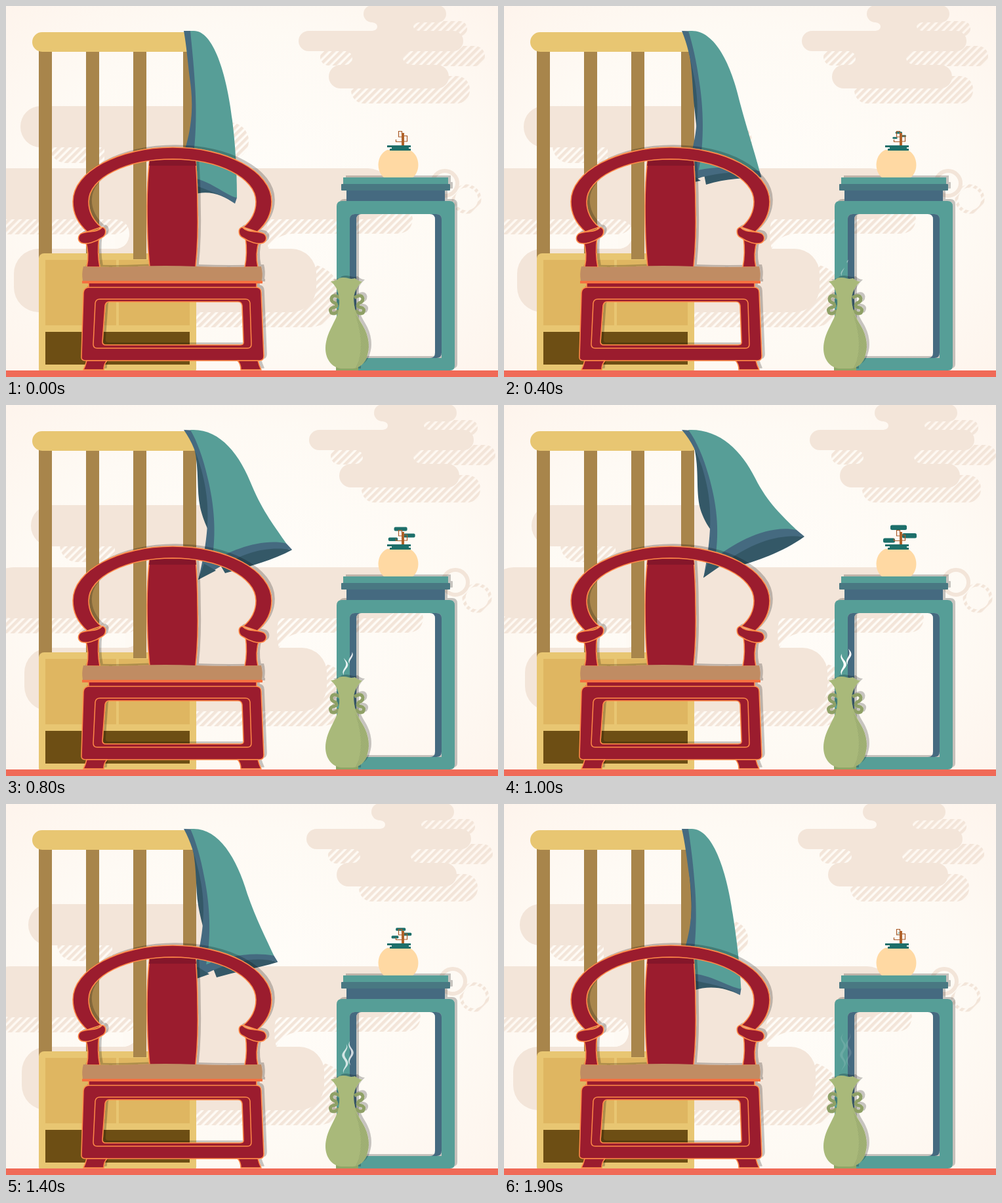
An HTML page that plays this animation: 750x567 px, repeating every 2 s.

```html
<!DOCTYPE html>
<html lang="en">
<head>
<meta charset="utf-8">
<title>Chair and table</title>
<style>
html, body { margin: 0; width: 100%; height: 100%; overflow: hidden; background: #fef8f0; }
svg { display: block; width: 100vw; height: 100vh; }
.solid { fill: #f3e5d9; }
.hatch { fill: url(#stripes); }
.wood { fill: #9b1b2f; stroke: #ff8a47; stroke-width: 1.6; stroke-linejoin: round; }
.post { fill: #a8854b; }
.gold { fill: #e8c672; }
.teal { fill: #579e97; }
.blue { fill: #456a80; }
.dark { fill: #345867; }
.pine { fill: #1d6f6a; }
</style>
</head>
<body>
<svg viewBox="0 0 750 567">
  <defs>
    <radialGradient id="paper" cx="50%" cy="50%" r="72%">
      <stop offset="0" stop-color="#fffdf9"/>
      <stop offset=".6" stop-color="#fefaf4"/>
      <stop offset="1" stop-color="#fef4ec"/>
    </radialGradient>
    <pattern id="stripes" width="8" height="8" patternUnits="userSpaceOnUse" patternTransform="rotate(45)">
      <rect width="4.6" height="8" fill="#f3e5d9"/>
    </pattern>
    <pattern id="grain" width="2" height="2" patternUnits="userSpaceOnUse" patternTransform="rotate(28)">
      <rect width="1" height="2" fill="#6f8050" opacity=".35"/>
    </pattern>
    <filter id="shadow" filterUnits="userSpaceOnUse" x="0" y="0" width="750" height="567">
      <feDropShadow dx="4" dy="-3" stdDeviation="0" flood-color="#000" flood-opacity=".22"/>
    </filter>
  </defs>

  <rect width="750" height="567" fill="url(#paper)"/>

  <g id="clouds">
    <g class="hatch">
      <rect x="600" y="23" width="103" height="23" rx="11.5"/>
      <rect x="590" y="61" width="140" height="31" rx="15.5"/>
      <rect x="479" y="65" width="80" height="26" rx="13"/>
      <rect x="526" y="107" width="181" height="42" rx="20"/>
      <rect x="66" y="186" width="110" height="54" rx="26"/>
      <rect x="280" y="178" width="90" height="57" rx="28"/>
      <rect x="-40" y="300" width="228" height="49" rx="22"/>
      <path d="M380 310H594Q620 312 620 326Q618 348 594 348H436Q410 350 400 371H380Z"/>
      <rect x="220" y="395" width="290" height="96" rx="48"/>
    </g>
    <g class="solid">
      <rect x="545" y="-1" width="126" height="26" rx="13"/>
      <path d="M558 25Q566 26 566 31.500Q566 37 558 38H630Q621 37 621 31Q621 26 630 25Z"/>
      <rect x="446" y="38" width="251" height="31" rx="15.500"/>
      <path d="M518 69Q528 71 528 80Q528 89 518 90H618Q605 88 605 79Q605 71 618 69Z"/>
      <rect x="492" y="90" width="183" height="36" rx="18"/>
      <rect x="22" y="153" width="312" height="63" rx="31"/>
      <path d="M150 215H320V249H150Z"/>
      <rect x="-44" y="248" width="634" height="78" rx="39"/>
      <path d="M166 326Q188 328 188 349Q186 370 166 371H400Q394 349 400 326Z"/>
      <rect x="12" y="371" width="461" height="97" rx="38"/>
    </g>
    <path d="M166 349H188Q186 370 166 371Z" fill="#fefaf4"/>
    <circle cx="669" cy="271" r="19" fill="none" stroke="#f3e5d9" stroke-width="6"/>
    <circle cx="702" cy="295" r="20" fill="none" stroke="url(#stripes)" stroke-width="5"/>
  </g>

  <g class="post">
    <rect x="50" y="60" width="20" height="325"/>
    <rect x="122" y="60" width="20" height="325"/>
    <rect x="270" y="60" width="20" height="325"/>
  </g>
  <rect class="gold" x="40" y="40" width="260" height="30" rx="15"/>
  <rect class="gold" x="50" y="378" width="240" height="185" rx="8"/>
  <path fill="#dfb661" d="M60 388H168V488H60ZM172 388H280V488H172Z"/>
  <rect fill="#6d4e14" x="60" y="498" width="220" height="50"/>
  <rect class="post" x="194" y="70" width="20" height="317"/>

  <g id="cloth"></g>

  <g filter="url(#shadow)">
    <path class="wood" d="M219 234C216 260 215 280 215 306C215 340 216 370 219 399H289C292 370 293 340 292 306C292 280 291 260 289 234Z"/>
    <path fill="#85182a" d="M219 236H289L290 244H218Z"/>
    <g id="arm" class="wood">
      <path d="M121 358C126 374 126 386 123 399H143C140 384 140 368 142 354Z"/>
    </g>
    <use href="#arm" transform="matrix(-1 0 0 1 507 0)"/>
    <path class="wood" d="M124 345C108 331 102 316 102 299C102 252 173 216 254 216C335 216 405 252 405 299C405 316 399 331 383 345L362 338C375 327 381 314 381 299C381 262 322 234 254 234C185 234 126 262 126 299C126 314 132 327 145 338Z"/>
    <g id="grip" class="wood">
      <path d="M114 348C124 343 139 347 147 338C154 340 153 351 146 354C136 361 123 365 115 362C109 359 109 352 114 348Z"/>
    </g>
    <use href="#grip" transform="matrix(-1 0 0 1 507 0)"/>
    <path class="wood" d="M126 422H382V431H126Z"/>
    <path class="wood" fill-rule="evenodd" d="M127 430H381Q389 430 389 438L393 535Q393 542 386 542H121Q114 542 115 535L118 438Q119 430 127 430ZM157 452Q152 452 151 458L147 513Q147 518 152 518H357Q363 518 362 513L360 458Q359 452 354 452Z"/>
    <path fill="none" stroke="#ff8a47" stroke-width="1.5" d="M143 448H365Q371 448 372 454L374 517Q374 523 368 523H139Q133 523 133 517L136 454Q137 448 143 448Z"/>
    <g id="foot" class="wood">
      <path d="M123 542H154Q149 547 149 556H118Q121 550 123 542Z"/>
    </g>
    <use href="#foot" transform="matrix(-1 0 0 1 507 0)"/>
    <path fill="#c08c63" d="M118 398Q160 400 200 398T290 398T389 398Q392 408 390 420H117Q115 408 118 398Z"/>
    <rect fill="#f5713f" x="116" y="420" width="275" height="4"/>
  </g>

  <g filter="url(#shadow)">
    <rect class="teal" x="514" y="262" width="160" height="10"/>
    <rect class="blue" x="519" y="282" width="150" height="16"/>
    <rect fill="#4a7882" x="511" y="272" width="166" height="10" rx="1"/>
    <path class="teal" fill-rule="evenodd" d="M512 298H676Q684 298 684 306V550Q684 557 677 557H511Q504 557 504 550V306Q504 298 512 298ZM532 318Q524 318 524 326V538H664V326Q664 318 656 318Z"/>
    <path class="blue" fill-rule="evenodd" d="M532 318H656Q664 318 664 326V530Q664 538 656 538H532Q524 538 524 530V326Q524 318 532 318ZM542 318Q534 318 534 326V530Q534 538 542 538H646Q654 538 654 530V326Q654 318 646 318Z"/>
  </g>

  <path fill="#ffd9a3" d="M581 220H615C632 228 632 253 620 262H576C564 253 564 228 581 220Z"/>
  <path class="pine" d="M581 213H617V216H614V218H617V221H585V218H588V216H581Z"/>
  <g id="leaves" class="pine">
    <rect x="589" y="183.500" width="25" height="7.500" rx="2.500"/>
    <rect x="607" y="196" width="22" height="7.500" rx="2.500"/>
    <rect x="578" y="203.500" width="18" height="7" rx="2.500"/>
  </g>
  <path fill="none" stroke="#a85a28" stroke-width="1.200" d="M604 200H598.500V191.500H603.500V196M606 198.500H611.500V207H606M594.500 204V207.500H603"/>
  <rect fill="#b0622a" x="603" y="194" width="4" height="19"/>

  <g filter="url(#shadow)">
    <g id="ear" fill="none" stroke="#8fa066" stroke-width="5">
      <path d="M509 446Q498 439 496 447Q496 453 502 454Q507 460 498 461Q492 463 496 469Q502 472 507 465"/>
    </g>
    <use href="#ear" transform="matrix(-1 0 0 1 1040 0)"/>
    <path fill="#8fa566" d="M503 551H537V557H503Z"/>
    <path fill="#a9b97a" d="M495 421Q504 420 508 416Q514 414 521 416Q527 418 532 416Q537 421 543 421Q532 431 530 445C530 463 535 473 543 487C553 503 555 520 551 533C548 547 538 553 529 554H510C496 552 487 539 487 523C487 505 498 488 503 477C509 463 509 451 507 441Q504 428 495 421Z"/>
    <path fill="url(#grain)" d="M531 468C535 476 539 481 543 487C553 503 555 520 551 533C548 545 540 551 533 553C546 528 541 495 531 468Z"/>
  </g>
  <g id="steam" fill="#fff"></g>

  <rect y="557" width="750" height="10" fill="#f06a57"/>
</svg>
<script>
const LOOP = 2000, STEP = 100;
const $ = id => document.getElementById(id);
const addPath = (parent, cls) => {
  const p = document.createElementNS('http://www.w3.org/2000/svg', 'path');
  if (cls) p.setAttribute('class', cls);
  parent.appendChild(p);
  return p;
};

// Cloth layers from back to front: class, hanging outline, blown outline
const layers = [
  ['dark',
    'M276 70C281 100 284 130 284 150C284 165 282 180 280 192L290 120Z',
    'M290 65C298 100 292 130 299 158C303 172 310 184 316 192L325 120Z'],
  ['dark',
    'M282 289C308 280 330 288 349 302L320 280L284 268Z',
    'M347 249C385 239 425 225 458 201L400 195L335 235Z'],
  ['blue',
    'M271 38C275 60 277 85 280 110C286 150 288 200 249 279L284 272C312 284 330 288 349 302L352 293L320 200L285 38Z',
    'M271 38C286 55 295 75 302 95C312 130 323 170 304 264L328 246C385 205 420 198 458 201L446 191L380 160L287 39Z'],
  ['dark',
    'M249 279L262 268L280 281Z',
    'M304 264L312 236L330 246Z'],
  ['teal',
    'M281 38L285 38C315 36 336 100 345 175C350 215 352 255 352 293C335 290 310 265 280 262C290 220 291 160 288 120C286 85 283 60 281 38Z',
    'M281 38L285 38C330 38 362 70 383 112C402 150 425 170 446 191C400 182 350 212 322 234C329 190 324 150 312 108C304 80 294 56 281 38Z']
].map(([cls, from, to]) => ({ el: addPath($('cloth'), cls), from, ends: to.match(/[\d.]+/g) }));

const morph = (from, ends, k) => {
  let i = 0;
  return from.replace(/[\d.]+/g, n => (+n + (ends[i++] - n) * k).toFixed(2));
};

// Tapered wisp that follows a sine centre line
const wisp = (x, amp, phase, bottom, top, width) => {
  const left = [], right = [], n = 24;
  for (let i = 0; i <= n; i++) {
    const y = bottom + (top - bottom) * i / n;
    const cx = x + amp * Math.sin((y - phase) * Math.PI / 13);
    const w = width * Math.sin(Math.PI * i / n) / 2;
    left.push(`${(cx - w).toFixed(2)} ${y.toFixed(2)}`);
    right.unshift(`${(cx + w).toFixed(2)} ${y.toFixed(2)}`);
  }
  return `M${left.concat(right).join('L')}Z`;
};
const wisps = [addPath($('steam')), addPath($('steam'))];

function draw(ms) {
  const p = ms / LOOP;
  const sway = 1 - Math.abs(1 - 2 * p);

  $('clouds').setAttribute('transform', `translate(${20 * sway} 0)`);
  for (const { el, from, ends } of layers) el.setAttribute('d', morph(from, ends, sway));
  $('leaves').setAttribute('transform', `translate(602 198) scale(${sway}) translate(-602 -198)`);

  const late = Math.max(0, p - 0.6);
  const width = 4.2 * Math.min(1, p * 2);
  wisps[0].setAttribute('d', wisp(517, 2.8, 390, 413 - 13 * late, 413 - 66 * p, width));
  wisps[1].setAttribute('d', wisp(525.5, 2.5, 373.5, 390 + 14 * p, 398 - 51 * p, p < 0.15 ? 0 : width * 0.85));
  $('steam').setAttribute('opacity', Math.min(1, 2.2 * p) * (1 - late / 0.4));
}

const start = performance.now();
function tick() {
  const ms = (performance.now() - start) % LOOP;
  draw(Math.floor(ms / STEP) * STEP);
  requestAnimationFrame(tick);
}
tick();
</script>
</body>
</html>
```
